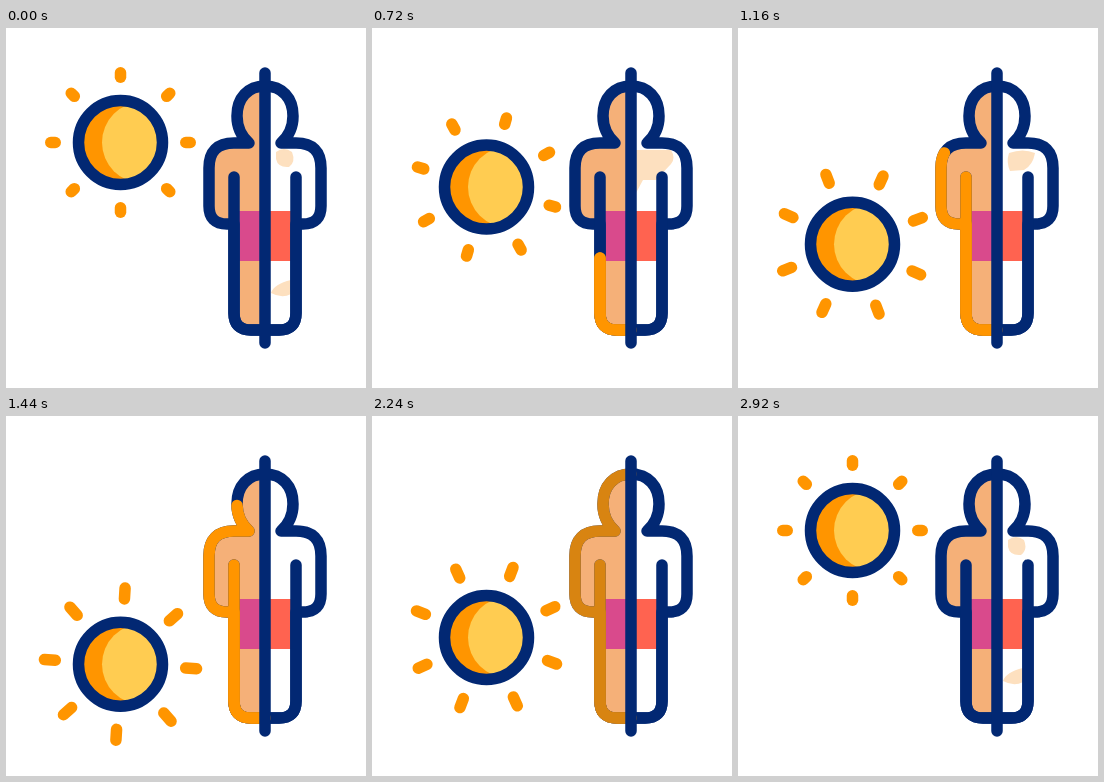
Recreate the animation shown at these times as an HTML page. Size 360 by 360 pixels, loop 3000 ms.

```html
<!DOCTYPE html>
<html lang="en">
<head>
<meta charset="utf-8">
<title>Sun tan</title>
<style>
  html, body { margin: 0; width: 100%; height: 100%; overflow: hidden; background: #fff; }
  svg { display: block; width: 100%; height: 100%; }
  .line { fill: none; stroke: #022873; stroke-width: 11.5; stroke-linecap: round; stroke-linejoin: round; }
  .glow { stroke: #ff9500; }
</style>
</head>
<body>
<svg viewBox="0 0 360 360">
  <defs>
    <path id="side" d="M259 302H245Q228 302 228 285V196H221Q203 196 203 178V140Q203 115 228 115H243C235 108 231 100 231 88C231 70 242 58 259 58"/>
    <path id="leg" d="M259 302H245Q228 302 228 285V149"/>
    <clipPath id="disc"><circle r="40"/></clipPath>
  </defs>

  <g id="sun">
    <g id="rays" class="line glow"></g>
    <circle r="40" fill="#ff9500"/>
    <circle cx="22" r="40.5" fill="#ffcc51" clip-path="url(#disc)"/>
    <circle r="42" class="line"/>
  </g>

  <use href="#side" fill="#f5b078"/>
  <path d="M228 183H259V233H228Z" fill="#d94a8c"/>
  <path d="M259 183H290V233H259Z" fill="#ff6350"/>
  <g fill="#fde0bf">
    <path class="skin" d="M270 124Q278 118 286 124Q290 134 283 139Q272 140 270 131ZM285 252Q268 256 265 265Q276 271 285 266Z"/>
    <path class="skin" d="M264 122H299Q304 130 299 136L284 152H271L264 165Z"/>
    <path class="skin" d="M271 125Q285 120 297 125Q295 137 286 142L272 143Q268 134 271 125Z"/>
  </g>

  <g class="line">
    <use href="#side"/>
    <use href="#leg"/>
    <g transform="matrix(-1 0 0 1 518 0)">
      <use href="#side"/>
      <use href="#leg"/>
    </g>
  </g>
  <g id="tan" class="line glow">
    <use href="#side"/>
    <use href="#leg"/>
  </g>
  <path class="line" d="M259 45V315"/>
</svg>
<script>
  const LOOP = 3000;
  const $ = id => document.getElementById(id);
  const sun = $('sun'), rays = $('rays'), tan = $('tan');
  const skin = document.querySelectorAll('.skin');
  const length = $('side').getTotalLength();

  for (let i = 0; i < 8; i++) {
    const ray = document.createElementNS('http://www.w3.org/2000/svg', 'path');
    ray.setAttribute('transform', `rotate(${i * 45})`);
    rays.append(ray);
  }

  // Smooth 0..1 ramp between two times
  function ramp(t, from, to) {
    const p = Math.min(1, Math.max(0, (t - from) / (to - from)));
    return p * p * (3 - 2 * p);
  }

  function draw(t) {
    const down = ramp(t, 100, 1860);
    const low = down - ramp(t, 1860, 2880);

    sun.setAttribute('transform', `translate(114.5 ${114.5 + 156 * low})`);
    rays.setAttribute('transform', `rotate(${-101 * low})`);
    for (const ray of rays.children) ray.setAttribute('d', `M0 -65.3V${-69.7 - 7.6 * low}`);

    tan.setAttribute('stroke-dasharray', `${length * down} 1000`);
    tan.setAttribute('opacity', down ? 1 - ramp(t, 2030, 2880) : 0);

    const shown = t < 120 || t >= 2600 ? 0 : t < 960 ? 1 : t < 1300 ? 2 : -1;
    skin.forEach((patch, i) => patch.setAttribute('opacity', i === shown ? 1 : 0));
  }

  const start = performance.now();
  function tick() {
    draw((performance.now() - start) % LOOP);
    requestAnimationFrame(tick);
  }
  tick();
</script>
</body>
</html>
```
